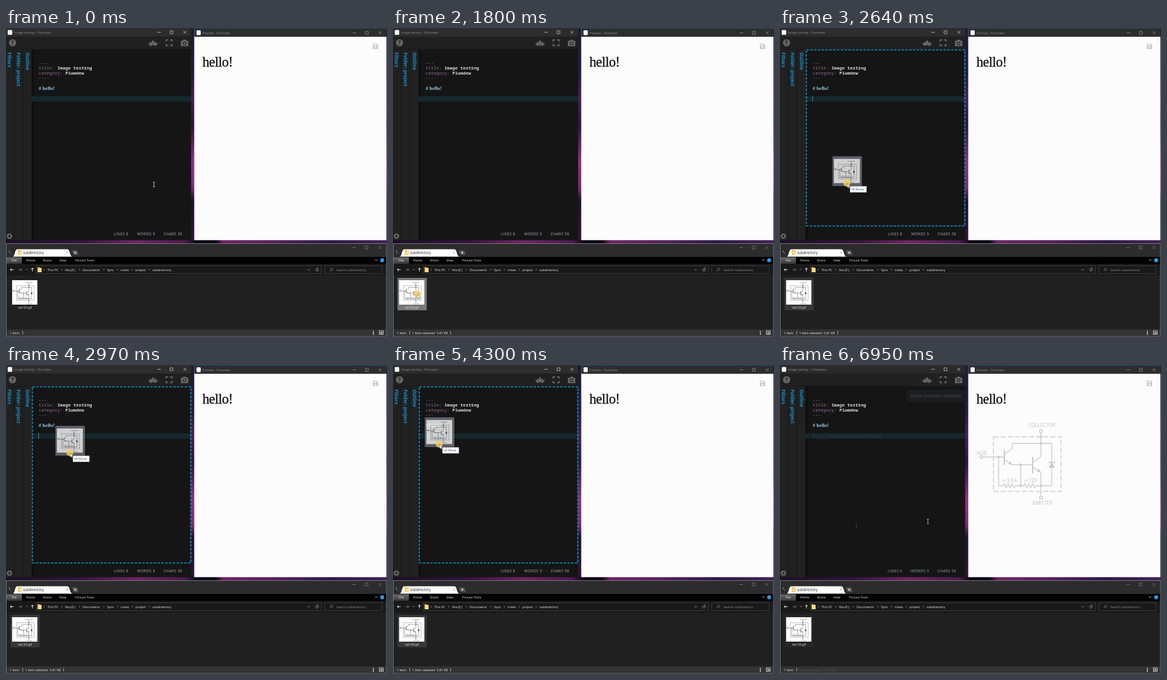
Write an HTML page that moves like this. It is 671x544 px and loops after 7.02 s.

```html
<!DOCTYPE html>
<html lang="en">
<head>
<meta charset="utf-8">
<title>Image testing</title>
<style>
html, body { margin: 0; width: 100%; height: 100%; overflow: hidden; background: #120c1e; }
svg { display: block; }
#stage { width: 671px; height: 544px; }
text { white-space: pre; }
.ui { font: 5.65px "Open Sans", "Noto Sans", sans-serif; fill: #f0f0f0; }
.ui .dim, .dim, .ui.dim { fill: #8b8b8b; }
.mono { font: 7.83px "Noto Sans Mono", "DejaVu Sans Mono", monospace; fill: #dcdcdc; }
.key { fill: #9a6a98; }
.val { font-weight: 600; }
.serif { font: 9.1px "Liberation Serif", serif; }
.serif.head { font-weight: 700; fill: #8fcbe8; }
.page { font: 24.2px "Liberation Serif", serif; letter-spacing: -.5px; fill: #111; stroke: #111; stroke-width: .35; }
.side { font: 700 8.3px "Open Sans", sans-serif; fill: #1991cd; }
.count { font: 6.5px "Open Sans", sans-serif; letter-spacing: .4px; fill: #a9aeb3; }
.label { font: 9px Roboto, sans-serif; letter-spacing: -.3px; fill: #000; }
.tip { font: 600 8.45px "Open Sans", sans-serif; fill: #dde5ea; }
.line { fill: none; stroke-width: 1; }
</style>
</head>
<body>
<svg id="stage" viewBox="0 0 671 544">
  <defs>
    <linearGradient id="wallV" x1="0" y1="0" x2="0" y2="1">
      <stop offset="0" stop-color="#1d1a38"/><stop offset=".22" stop-color="#251a42"/>
      <stop offset=".32" stop-color="#4a1f58"/><stop offset=".45" stop-color="#2c1440"/>
      <stop offset=".62" stop-color="#8c3080"/><stop offset=".74" stop-color="#7a2a70"/>
      <stop offset=".8" stop-color="#1f1030"/><stop offset="1" stop-color="#2e163e"/>
    </linearGradient>
    <linearGradient id="wallH">
      <stop offset="0" stop-color="#1c0e28"/><stop offset=".2" stop-color="#34143c"/>
      <stop offset=".34" stop-color="#6e2466"/><stop offset=".47" stop-color="#4a1a50"/>
      <stop offset=".5" stop-color="#0c0714"/><stop offset=".55" stop-color="#0c0714"/>
      <stop offset=".57" stop-color="#6e2468"/><stop offset=".72" stop-color="#542058"/>
      <stop offset=".85" stop-color="#2c1844"/><stop offset="1" stop-color="#422256"/>
    </linearGradient>
    <linearGradient id="fileTab" x1="0" y1="0" x2="0" y2="1">
      <stop offset="0" stop-color="#6a6a6a"/><stop offset="1" stop-color="#3a3a3a"/>
    </linearGradient>
    <linearGradient id="shade">
      <stop offset="0" stop-color="#000" stop-opacity=".45"/><stop offset="1" stop-color="#000" stop-opacity="0"/>
    </linearGradient>

    <symbol id="circuit" viewBox="346 90 172 161" preserveAspectRatio="none">
      <rect x="346" y="90" width="172" height="161" fill="#fff"/>
      <g fill="none" stroke="#000" stroke-width="1.4">
        <path stroke-dasharray="9 3.5" d="M376 126.500H495V222.500H376Z"/>
        <path d="M358 162H395M395 157L409 147V138H478.500V212.500H459.500M395 166L409 175.500H445
          M445 172L459.500 161V119M445 180L459.500 189V231M424 175.500V212.500M385 162V212.500H393
          l2 -3.500 3.500 7 3.500 -7 3.500 7 3.500 -7 3.500 7 2 -3.500H429
          l2 -3.500 3.500 7 3.500 -7 3.500 7 3.500 -7 3.500 7 2 -3.500H459.500"/>
        <path stroke-width="2" d="M395 149V176M445 162V191M473 171.500H484"/>
        <g fill="#fff"><circle cx="459.500" cy="116.500" r="2.500"/><circle cx="354.500" cy="162" r="2.500"/><circle cx="459.500" cy="233.500" r="2.500"/></g>
      </g>
      <path d="M478.500 171.500L484 181H473ZM409 175.500L402 174.500L405.500 169.500ZM459.500 189L452 187.500L455.500 182.500Z"/>
      <circle cx="385" cy="162" r="2.200"/><circle cx="424" cy="175.500" r="2.200"/><circle cx="424" cy="212.500" r="2.200"/>
      <circle cx="459.500" cy="138" r="2.200"/><circle cx="459.500" cy="126.500" r="2.200"/><circle cx="459.500" cy="212.500" r="2.200"/>
      <g class="label">
        <text x="437.500" y="108.500">COLLECTOR</text><text x="445" y="246">EMITTER</text>
        <text x="343.500" y="158">BASE</text>
        <text x="390.500" y="205.500">≃ 8.0 k</text><text x="429" y="205.500">≃ 120</text>
      </g>
    </symbol>
    <g id="controls" class="line">
      <path d="M-46 7.500h6M-23.500 5h5v5h-5zM0 5l5 5M5 5l-5 5"/>
    </g>
    <path id="ibeam" d="M-1.800 -4h1.300l.5 .6 .5 -.6h1.300M0 -3.500V3.500M-1.800 4h1.300l.5 -.6 .5 .6h1.300" fill="none" stroke="#e8e8e8" stroke-width=".9"/>
    <g id="folder"><path d="M0 0h3l1 1h3v8h-7z" fill="#e8b64a"/><path d="M1 2h6v7h-6z" fill="#fbdc8c"/></g>
  </defs>

  <!-- wallpaper -->
  <rect width="671" height="544" fill="#1a1228"/>
  <rect x="326" width="6" height="380" fill="url(#wallV)"/>
  <rect x="669" width="2" height="380" fill="url(#wallV)"/>
  <rect y="373" width="671" height="7" fill="url(#wallH)"/>
  <rect width="331" height="1" fill="#2c2a50"/><rect x="331" width="340" height="1" fill="#0b5878"/>

  <!-- editor window -->
  <rect y="1" width="326" height="372.500" fill="#151515"/>
  <rect y="1" width="326" height="14.500" fill="#2d2d2d"/>
  <rect class="end" y="1" width="326" height="14.500" fill="#202020"/>
  <rect y="15.500" width="326" height="22" fill="#202020"/>
  <rect y="37.500" width="45" height="336" fill="#212121"/>
  <path class="line" stroke="#151515" d="M14.500 38V373M29.500 38V373M0 37.500H326"/>
  <rect x="45" y="38" width="6" height="335" fill="url(#shade)"/>
  <rect x="3" y="3.500" width="8" height="8.500" rx="1.500" fill="#f4f4f4"/>
  <g class="ui">
    <g class="start"><text class="dim" x="14" y="10">Image testing – Plumdew</text></g>
    <g class="end"><text x="14" y="10">Image testing • – Plumdew</text></g>
  </g>
  <use class="start" href="#controls" x="312.500" stroke="#b4b4b4"/>
  <use class="end" href="#controls" x="312.500" stroke="#f4f4f4"/>
  <g fill="#666">
    <circle cx="11.500" cy="26" r="6.300"/>
    <path d="M259 21c3 3 3 7 0 10c-3 -3 -3 -7 0 -10zM254.500 23.500c2 1 3 4 3 7.500c-3 -1 -4 -4 -3 -7.500zM263.500 23.500c-2 1 -3 4 -3 7.500c3 -1 4 -4 3 -7.500zM251 26c3 0 5 2 6 5.500c-4 0 -6 -2 -6 -5.500zM267 26c-3 0 -5 2 -6 5.500c4 0 6 -2 6 -5.500z"/>
    <path d="M308 22.500h3l1.500 -2h4l1.500 2h3v9.500h-13z"/>
  </g>
  <text x="11.500" y="29.700" text-anchor="middle" font-family="Open Sans, sans-serif" font-weight="700" font-size="10" fill="#202020">?</text>
  <path class="line" stroke="#666" style="stroke-width:1.800" d="M282 24V21H285.500M289 21H292.500V24M292.500 28V31H289M285.500 31H282V28"/>
  <circle cx="314.500" cy="27" r="2.500" fill="none" stroke="#202020" stroke-width="1.200"/>
  <circle cx="6" cy="366.500" r="3" fill="none" stroke="#6c6c6c" stroke-width="2"/>
  <circle cx="6" cy="366.500" r="4.500" fill="none" stroke="#6c6c6c" stroke-width="1.300" stroke-dasharray="1.800 1.734"/>
  <g class="side">
    <text transform="translate(3 43) rotate(90)">Filters</text>
    <text transform="translate(18.500 43) rotate(90)">Folder: project</text>
    <text transform="translate(34.500 43) rotate(90)">Outline</text>
  </g>
  <rect x="45" y="120" width="281" height="9.300" fill="#14282c"/>
  <g class="mono">
    <text class="dim" x="57.500" y="64">---</text>
    <text x="57.500" y="73"><tspan class="key">title:</tspan><tspan class="val"> Image testing</tspan></text>
    <text x="57.500" y="81.500"><tspan class="key">category:</tspan><tspan class="val"> Plumdew</tspan></text>
    <text class="dim" x="57.500" y="90">---</text>
  </g>
  <text class="serif head" x="57.500" y="108.500"># hello!</text>
  <g class="end serif">
    <text x="57.500" y="128" fill="#8f9c9c"><tspan fill="#e8e8e8" font-weight="700">!</tspan><tspan fill="#a05f9f">[<tspan text-decoration="underline">tip120</tspan>]</tspan>(subdirectory/tip120.gif)</text>
  </g>
  <g class="count">
    <g class="start"><text x="190" y="364.500">LINES 8</text><text x="231" y="364.500">WORDS 9</text><text x="277.500" y="364.500">CHARS 58</text></g>
    <g class="end"><text x="186" y="364.500">LINES 8</text><text x="227" y="364.500">WORDS 10</text><text x="277" y="364.500">CHARS 92</text></g>
  </g>
  <rect id="drop" x="46.500" y="38.500" width="279" height="310" fill="none" stroke="#1680ae" stroke-width="2.200" stroke-dasharray="4.500 2.200"/>
  <path id="caret" class="line" stroke="#5f7d86" d="M57.500 119.500V130"/>
  <g class="end">
    <g fill="#2b3d49" style="filter:drop-shadow(0 1px 2px #0008)">
      <path d="M309.500 44L314 39.500L318.500 44Z"/>
      <rect x="223" y="43" width="102" height="22.500" rx="5"/>
    </g>
    <text class="tip" x="229" y="57.300">Show preview window</text>
  </g>

  <!-- preview window -->
  <rect x="331.500" y="1" width="338.500" height="372.500" fill="#fcfcfc"/>
  <rect x="331.500" y="1" width="338.500" height="14.500" fill="#2d2d2d"/>
  <rect x="335.500" y="4" width="7.500" height="8.500" rx="1.500" fill="#f4f4f4"/>
  <text class="ui dim" x="346" y="10.500">Preview - Plumdew</text>
  <use href="#controls" x="656.500" y="1" stroke="#858585"/>
  <path d="M646 27.500h7l2.500 2.500v7h-9.500z" fill="#c9c9c9"/><path d="M647.500 29h5v2.300h-5z" fill="#fcfcfc"/><circle cx="650.700" cy="34.300" r="1.500" fill="#fcfcfc"/>
  <text class="page" x="346" y="68">hello!</text>
  <use class="end" href="#circuit" x="346" y="90" width="172" height="161"/>

  <!-- file window -->
  <rect y="379.500" width="670" height="163.500" fill="#202020"/>
  <rect y="379.500" width="670" height="23.500" fill="#2c2c2c"/>
  <path class="line" stroke="#777" d="M5 393l4.500 5M4.500 392.500l2 0v2.500"/>
  <path d="M12 402.500C16 402 15 389.500 20 389.500H108C113 389.500 112 402 117 402.500Z" fill="#fdfdfd"/>
  <use href="#folder" x="21" y="391"/>
  <text class="ui" x="30" y="397.800" style="font-size:6.200px;fill:#222">subdirectory</text>
  <path class="line" stroke="#888" style="stroke-width:.7" d="M106 394l3 3M109 394l-3 3"/>
  <path d="M116 391.500H125.500L128 399.500H119Z" fill="#555"/>
  <path class="line" stroke="#eee" d="M120 395.500h4M122 393.500v4"/>
  <use href="#controls" x="656" y="379" stroke="#707070"/>
  <rect y="403" width="670" height="12.500" fill="#000"/>
  <rect y="403.500" width="28" height="11.500" fill="url(#fileTab)"/>
  <g class="ui">
    <text x="10" y="411">File</text><text x="35.500" y="411">Home</text><text x="65" y="411">Share</text>
    <text x="94" y="411">View</text><text x="122" y="411">Picture Tools</text>
  </g>
  <path class="line" stroke="#ddd" d="M650 407.500l2 2 2 -2"/>
  <circle cx="662.500" cy="409" r="3.800" fill="#1583c8"/>
  <text class="ui" x="662.500" y="411.200" text-anchor="middle" style="font-weight:700">?</text>
  <rect y="415.500" width="670" height="20" fill="#191919"/>
  <g class="line" stroke="#e8e8e8">
    <path d="M13.500 425.500H7.500M10 423L7.500 425.500L10 428M46.500 428.500V422.500M44 425L46.500 422.500L49 425"/>
    <path stroke="#777" d="M22 425.500H28M25.500 423L28 425.500L25.500 428"/>
    <path stroke="#999" d="M35 424.500l1.500 1.500 1.500 -1.500"/>
  </g>
  <g fill="#191919" stroke="#484848" stroke-width=".8"><rect x="53.500" y="418.500" width="502" height="14"/><rect x="561.500" y="418.500" width="101" height="14"/></g>
  <use href="#folder" x="55.500" y="421"/>
  <g class="ui" id="crumbs"></g>
  <path class="line" stroke="#999" d="M531 424.500l2 2 2 -2M549 423.500a2.400 2.400 0 1 1 -2.500 0M549 421.500v2.500h-2"/>
  <path class="line" stroke="#888" style="stroke-width:.8" d="M570 428l2 -2a2 2 0 1 1 .5 .5"/>
  <text class="ui dim" x="582" y="427.500">Search subdirectory</text>
  <rect id="pick" x="8" y="440" width="51.500" height="57"/>
  <use href="#circuit" x="10.500" y="444" width="45" height="43"/>
  <text class="ui" x="33.500" y="494" text-anchor="middle">tip120.gif</text>
  <rect y="530.500" width="670" height="12" fill="#333"/>
  <text class="ui" x="7" y="538.500">1 item</text>
  <path class="line" stroke="#ccc" style="stroke-width:.8" d="M29.500 533.500V539.500"/>
  <g id="picked"><text class="ui" x="34" y="538.500">1 item selected  5.81 KB</text><path class="line" stroke="#ccc" style="stroke-width:.8" d="M101.500 533.500V539.500"/></g>
  <path d="M646 533.500h2v1.500h-2zM646 536h2v1.500h-2zM646 538.500h2v1.500h-2z" fill="#ddd"/>
  <rect x="657.500" y="533" width="7" height="6.500" fill="#555" stroke="#ddd" stroke-width=".8"/><path d="M659.500 536h3.500v1.500h-3.500z" fill="#eee"/>
  <rect class="line" x=".5" y="379.500" width="669.500" height="163.500" stroke="#7c7c7c"/>

  <!-- pointer -->
  <use class="start" id="rest" href="#ibeam" x="260.500" y="275.500"/>
  <g id="pointer">
    <g id="ghost" opacity=".8">
      <rect x="-26" y="-48" width="52" height="52.500" rx="1.500" fill="#6c727c"/>
      <use href="#circuit" x="-23.500" y="-43.500" width="46" height="43"/>
    </g>
    <circle id="press" cx="-.5" cy="-.5" r="6" fill="#f5cb55" opacity=".85"/>
    <path id="arrow" d="M0 0V7.500L1.800 6L3 8.800L4.200 8.300L3 5.600H5.300Z" fill="#fff" stroke="#333" stroke-width=".5"/>
    <use id="beam" href="#ibeam"/>
    <g id="deny"><circle cx="10" cy="10" r="3" fill="#333" stroke="#ddd" stroke-width="1.300"/><path d="M8 8l4 4" stroke="#ddd"/></g>
    <g id="move">
      <rect x="5" y="5" width="29" height="10.500" fill="#fff" stroke="#999" stroke-width=".6"/>
      <path class="line" stroke="#3a6ea5" style="stroke-width:.8" d="M7 10.200h6M10.800 8l2.200 2.200 -2.200 2.200"/>
      <text class="ui" x="15" y="12.300" style="fill:#31507c">Move</text>
    </g>
  </g>
</svg>
<script>
const LOOP = 7020, DROP = 4640;
const $ = id => document.getElementById(id);
const all = name => [...document.getElementsByClassName(name)];
const starts = all('start'), ends = all('end');
const between = (t, a, b) => t >= a && t < b;
const show = (id, on) => { $(id).style.display = on ? '' : 'none'; };

const crumbs = [['This PC', 73], ['Nia (E:)', 104], ['Documents', 135], ['Sync', 178],
  ['notes', 202], ['project', 228], ['subdirectory', 258]];
$('crumbs').innerHTML = crumbs.map(([name, x]) =>
  `<text x="${x}" y="427.500">${name}</text><path class="line" stroke="#aaa" style="stroke-width:.8" d="M${x - 6.5} 424l1.500 1.500 -1.500 1.500"/>`).join('');

// time, x, y of the pointer
const path = [
  [750, 260.5, 275.5], [1430, 43, 469], [1890, 43, 469], [2170, 115, 414],
  [2310, 116, 355], [2880, 120, 215], [2970, 113, 155], [3550, 79, 99],
  [3730, 79, 103], [4300, 82, 140], [DROP, 82, 140], [5070, 134, 282],
  [5210, 134, 282.5], [5580, 134.5, 282.5]
];
const eased = new Set([1430, 5070]);

function pointerAt(t) {
  const i = path.findIndex(p => p[0] > t);
  if (i === 0) return path[0].slice(1);
  if (i < 0) return path[path.length - 1].slice(1);
  const [a, x, y] = path[i - 1], [b, u, v] = path[i];
  let k = (t - a) / (b - a);
  if (eased.has(b)) k = k * k * (3 - 2 * k);
  return [x + (u - x) * k, y + (v - y) * k];
}

function draw(t) {
  // closing dissolve runs in four steps
  const back = t < 6740 ? 0 : Math.min(4, 1 + Math.floor((t - 6740) / 70)) / 5;
  const done = t < DROP ? 0 : 1 - back;
  starts.forEach(e => { e.style.opacity = 1 - done; });
  ends.forEach(e => { e.style.opacity = done; });

  const [x, y] = pointerAt(t);
  const inText = y < 373, held = between(t, 1480, DROP);
  const dragging = between(t, 2220, DROP), inside = between(t, 2400, DROP);
  show('rest', t < 750 || t >= DROP);
  show('pointer', t >= 750);
  $('pointer').setAttribute('transform', `translate(${x} ${y})`);
  $('pointer').style.opacity = t < DROP ? 1 : 1 - back;
  show('ghost', dragging);
  show('press', held);
  show('beam', inText && !held);
  show('arrow', (!inText || held) && !between(t, 2220, 2400));
  show('deny', between(t, 2170, 2400));
  show('move', inside);
  show('drop', inside);
  show('caret', between(t, 2450, 3500));

  const hover = t >= 1360;
  $('pick').style.fill = t < 1480 ? '#4d4d4d' : t < 1990 ? '#777' : '#373737';
  $('pick').style.opacity = hover ? 1 - back : 0;
  $('picked').style.opacity = t < 1480 ? 0 : 1 - back;
}

function tick() {
  draw(performance.now() % LOOP);
  requestAnimationFrame(tick);
}
tick();
</script>
</body>
</html>
```
